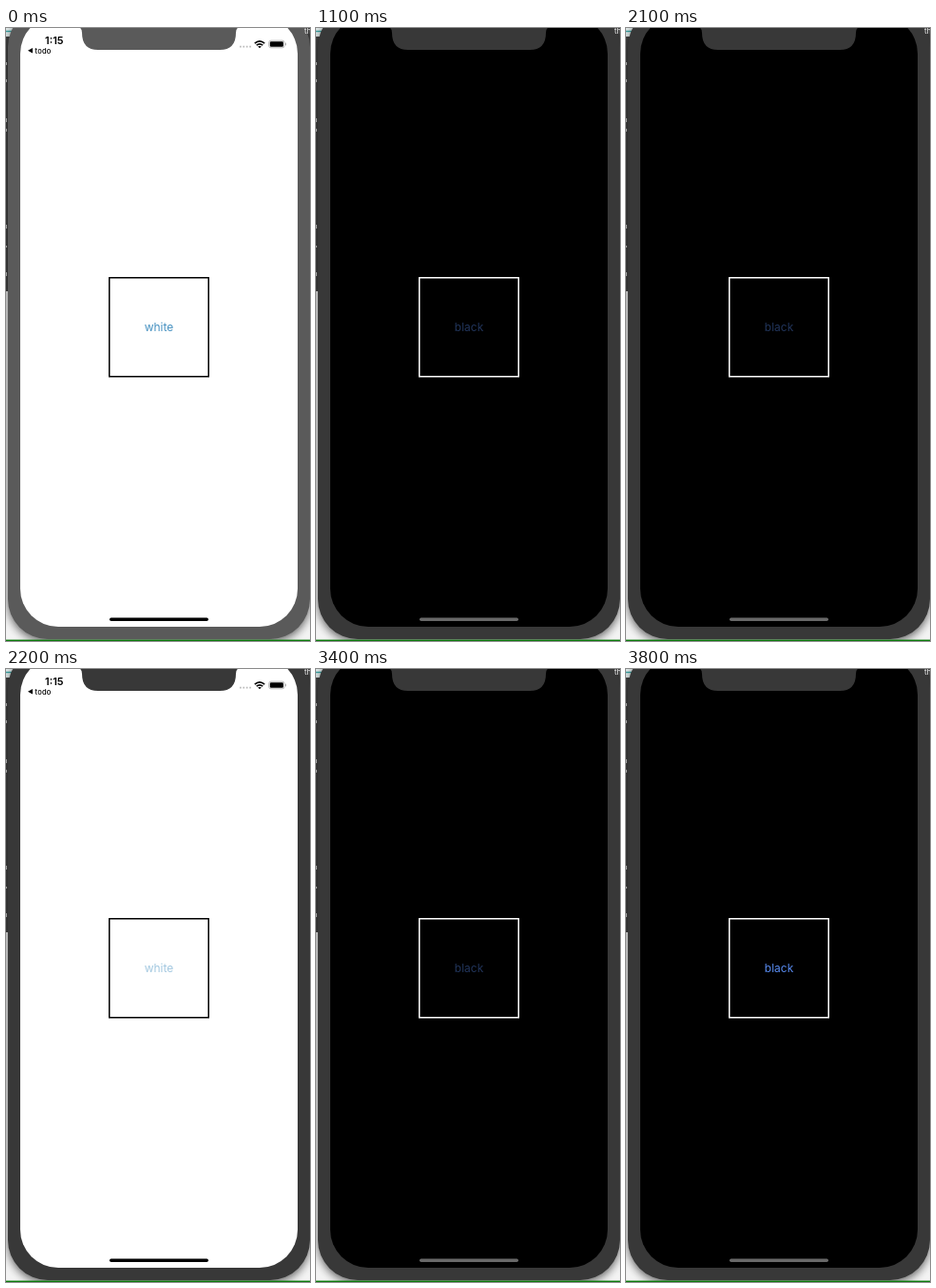
Write an HTML page that moves like this. It is 320 px wide and 645 px high and loops after 4 s.

```html
<!DOCTYPE html>
<html lang="en">
<head>
<meta charset="utf-8">
<title>Theme toggle</title>
<style>
  html, body { margin: 0; width: 100%; height: 100%; overflow: hidden; background: #fff; }
  svg { display: block; width: 320px; height: 645px; }
  text { font-family: Inter, Roboto, sans-serif; }
  #phone { filter: drop-shadow(0 3px 5px #0009); }
</style>
</head>
<body>
<svg viewBox="0 0 320 645">
  <!-- desktop behind the phone -->
  <rect width="320" height="645" fill="#f4f4f4"/>
  <rect width="10" height="277" fill="#444"/>
  <rect width="10" height="9" fill="#e4eeee"/>
  <path d="M0 3.5h7" stroke="#3aa5a5" stroke-width="1.5"/>
  <path d="M.5 36v3M.5 54v3M.5 95v4M.5 106v3M.5 207v4M.5 229v2M.5 257v4" stroke="#ccc"/>
  <rect x="308" width="12" height="277" fill="#444"/>

  <g id="phone"><rect id="bezel" x="2" y="-22" width="318" height="665" rx="42"/></g>
  <text x="314" y="6" font-size="8" fill="#eee">th</text>
  <rect y="643.6" width="320" height="1.4" fill="#0b7a0b"/>

  <rect id="screen" x="15" y="-13" width="292" height="643" rx="40"/>
  <path id="notch" d="M75-1Q80-1 80 5Q80 23 97 23H225Q242 23 242 5Q242-1 247-1Z"/>

  <g id="status">
    <text x="41" y="16.5" font-size="11" font-weight="600">1:15</text>
    <path d="M23 23.7l5-2.8v5.6z"/>
    <text x="30.5" y="26.6" font-size="7.5" font-weight="500" letter-spacing=".2">todo</text>
    <path d="M246 19.7h12" stroke="#bbb" stroke-width="1.7" stroke-dasharray="1.7 1.7"/>
    <g fill="none" stroke="#000" stroke-width="1.6">
      <path d="M261.8 16.2q5.2-4.6 10.4 0M263.7 18.2q3.3-2.8 6.6 0"/>
      <path d="M265.8 19.6h2.4l-1.2 1.2z" stroke-width="1"/>
    </g>
    <rect x="276.7" y="13.2" width="16.4" height="7.6" rx="2.2" fill="none" stroke="#aaa" stroke-width=".8"/>
    <rect x="277.8" y="14.2" width="14.2" height="5.6" rx="1.3"/>
    <path d="M294.4 15.7v2.6" stroke="#aaa"/>
  </g>

  <rect id="box" x="108.75" y="262.75" width="104.5" height="104" fill="none" stroke-width="1.5"/>
  <text id="label" x="161" y="319" font-size="12" text-anchor="middle"></text>
  <rect id="home" x="109" y="620.6" width="104" height="3.4" rx="1.7"/>
</svg>
<script>
const $ = id => document.getElementById(id);
const LOOP = 4000, STEP = 100;

// label opacity per step, from the given start time until the next entry
const fades = [
  [0, [1]],
  [1100, [.38, .55, .82, 1]],
  [1800, [.85, .6, .45, .38]],
  [2200, [.5, .8, 1]],
  [3400, [.38, .5, .7, .9, 1]],
];

function opacityAt(t) {
  const [start, levels] = fades.findLast(f => f[0] <= t);
  return levels[Math.min((t - start) / STEP, levels.length - 1)];
}

function draw(t) {
  const dark = t >= 1100 && t < 2200 || t >= 3400;
  const frame = t < 1100 ? '#5a5a5a' : '#383838';
  const paint = (id, name, value) => $(id).setAttribute(name, value);
  paint('bezel', 'fill', frame);
  paint('notch', 'fill', frame);
  paint('screen', 'fill', dark ? '#000' : '#fff');
  paint('box', 'stroke', dark ? '#fff' : '#000');
  paint('home', 'fill', dark ? '#686868' : '#000');
  paint('status', 'visibility', dark ? 'hidden' : 'visible');
  paint('label', 'fill', dark ? '#588bf0' : '#4590c0');
  paint('label', 'opacity', opacityAt(t));
  $('label').textContent = dark ? 'black' : 'white';
}

const begin = performance.now();
function tick() {
  const t = (performance.now() - begin) % LOOP;
  draw(Math.floor(t / STEP) * STEP);
  requestAnimationFrame(tick);
}
tick();
</script>
</body>
</html>
```
